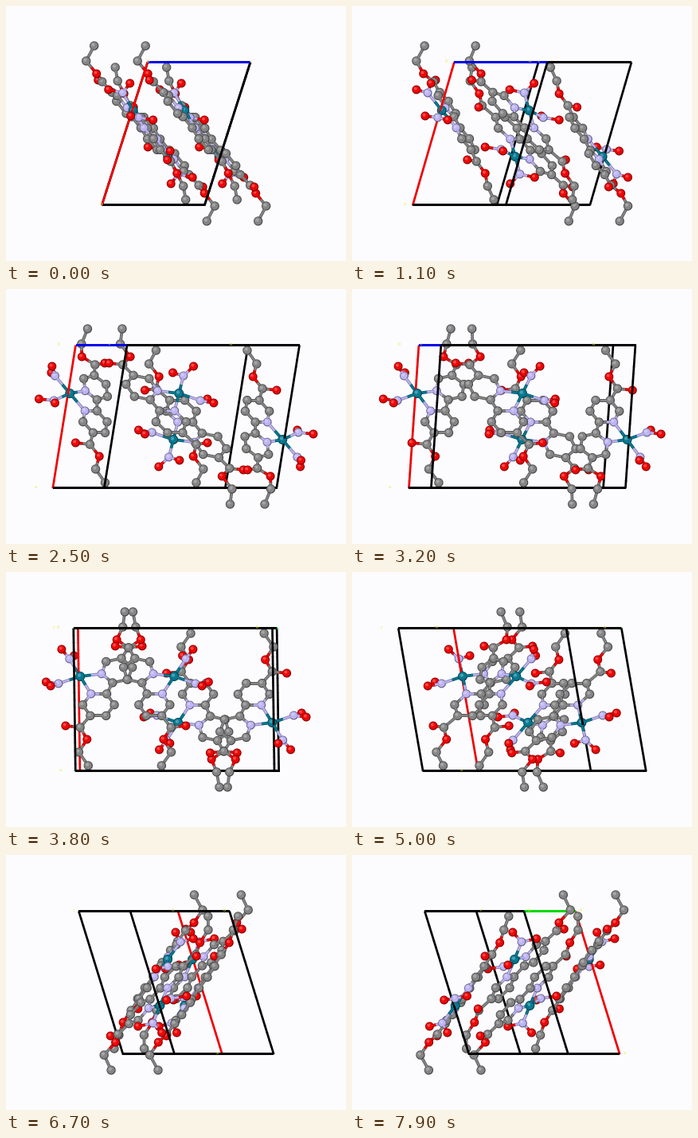
These frames come from a looping animation (427 px wide and 320 px high, 8000 ms). A matplotlib script:

```python
import numpy as np
import matplotlib.pyplot as plt
from matplotlib.animation import FuncAnimation
from matplotlib.collections import PolyCollection
from matplotlib.colors import to_rgb

W, H, FRAMES, STEP = 427, 320, 80, 2.5
CX, CY = 213.7, 160
A = np.array([-57.4, 179, 0])
B = np.array([0, 0, 250.0])
C = np.array([129, 0, 0])
ORIGIN = -(A + B + C) / 2

COLORS = {"C": "#858585", "O": "#f00505", "N": "#bdb4f4", "Pd": "#077a92"}
RADIUS = {"C": 5.7, "O": 5.5, "N": 5.5, "Pd": 6.0}


def ring(z, v, start, turn):
    """Hexagon in the tilted molecular plane."""
    t = np.radians(start + turn * np.arange(6))
    zs, ys = z + 19.7 * np.cos(t), (v + 19.7 * np.sin(t)) / 1.244
    xs = -54 + 0.74 * (ys + 29) - 0.194 * (zs + 123)
    return np.column_stack([xs, ys, zs])


PYRIDINE = ["N", "C", "C", "C", "C", "C"]
REST = [
    ("Pd", -54, -29, -123),
    # upper ester
    ("C", -93, -65, -64), ("O", -98, -67, -47), ("O", -100, -75, -79),
    ("C", -113, -91, -72), ("C", -103, -110, -69),
    # lower ester
    ("C", -7, 35, -121), ("O", -11, 33, -139.5), ("O", 1, 50, -112),
    ("C", 9, 66, -122), ("C", 12, 83, -110),
    # nitro groups
    ("N", -67, -51, -137), ("O", -58, -63, -146.5), ("O", -85, -55, -132),
    ("N", -47, -20, -150), ("O", -29, -17, -159), ("O", -57, -22, -166),
]
unit = np.vstack([ring(-77.4, -45.2, 165, -60), ring(-99, 8.3, 240, 60),
                  [r[1:] for r in REST]])
kinds = (PYRIDINE * 2 + [r[0] for r in REST]) * 4
bonds = [(i + k, (i + 1) % 6 + k) for k in (0, 6) for i in range(6)]
bonds += [(1, 7), (12, 0), (12, 6), (4, 13), (10, 18)]
for c in (13, 18):
    bonds += [(c, c + 1), (c, c + 2), (c + 2, c + 3), (c + 3, c + 4)]
for n in (23, 26):
    bonds += [(12, n), (n, n + 1), (n, n + 2)]

glide = unit * [1, 1, -1] + [64.5, 0, -125]
atoms = np.vstack([unit, glide, -glide, -unit])
n_unit = len(unit)


def shade(color, k):
    rgb = np.array(to_rgb(color))
    return tuple(rgb * k if k <= 1 else 1 - (1 - rgb) * (2 - k))


# straight pieces: start, end, [(width, colour), ...]
sticks = []
for m in range(4):
    for i, j in bonds:
        i, j = i + m * n_unit, j + m * n_unit
        p, q = atoms[i], atoms[j]
        mid, u = (p + q) / 2, (q - p) / np.linalg.norm(q - p)
        for k, s in ((i, p + 4.3 * u), (j, q - 4.3 * u)):
            col = COLORS[kinds[k]]
            sticks.append((s, mid, [(3.8, shade(col, 0.72)), (2.0, to_rgb(col))]))

PIECES = 20
for axis, o1, o2, col in ((A, B, C, "#f00000"), (B, A, C, "#00d800"), (C, A, B, "#0000e8")):
    for i in (0, 1):
        for j in (0, 1):
            start = ORIGIN + i * o1 + j * o2
            tint = to_rgb(col if i + j == 0 else "black")
            for k in range(PIECES):
                p = start + axis * k / PIECES
                q = start + axis * (k + 1.08) / PIECES
                sticks.append((p, q, [(2.7, tint)]))

starts = np.array([s[0] for s in sticks])
ends = np.array([s[1] for s in sticks])

turn = np.linspace(0, 2 * np.pi, 24, endpoint=False)
DISC = np.column_stack([np.cos(turn), np.sin(turn)])


def ball(kind):
    col, r = COLORS[kind], RADIUS[kind]
    return [(DISC * r, shade(col, 0.55)),
            (DISC * (r - 1) - 0.2, to_rgb(col)),
            (DISC * r * 0.36 - [1.2, 1.4], shade(col, 1.28))]


BALLS = {k: ball(k) for k in COLORS}


def project(pts, th):
    """Screen position and nearness after a turn about the vertical axis."""
    x, y, z = np.asarray(pts).T
    c, s = np.cos(th), np.sin(th)
    return np.column_stack([CX + x * c + z * s, CY + y]), x * s - z * c


def scene(th):
    items = []
    pos, near = project(atoms, th)
    for xy, d, kind in zip(pos, near, kinds):
        items.append((d, [(xy + shape, col) for shape, col in BALLS[kind]]))
    p, dp = project(starts, th)
    q, dq = project(ends, th)
    for a, b, d, (_, _, layers) in zip(p, q, (dp + dq) / 2, sticks):
        u = b - a
        length = np.hypot(*u)
        if length < 0.1:
            continue
        n = np.array([-u[1], u[0]]) / length / 2
        quads = [(np.array([a + n * w, b + n * w, b - n * w, a - n * w]), col)
                 for w, col in layers]
        items.append((d, quads))
    items.sort(key=lambda it: it[0])
    return [shape for _, shapes in items for shape in shapes]


# the small extra keeps rounding from losing a pixel column
fig = plt.figure(figsize=((W + 0.01) / 100, (H + 0.01) / 100), dpi=100, facecolor="#fcfcff")
ax = fig.add_axes([0, 0, 1, 1])
ax.set_xlim(0, W)
ax.set_ylim(H, 0)
ax.axis("off")
model = PolyCollection([], linewidths=0, edgecolors="none")
ax.add_collection(model, autolim=False)

label_pts = np.array([ORIGIN, ORIGIN + A, ORIGIN + B, ORIGIN + C]) + [0, -1.5, -25]
labels = [ax.text(0, 0, t, fontsize=3.6, color="#f2e640", ha="center", va="center")
          for t in "0abc"]


def draw(n):
    th = np.radians(STEP * max(n - 1, 0))
    shapes = scene(th)
    model.set_verts([s[0] for s in shapes])
    model.set_facecolor([s[1] for s in shapes])
    for text, xy in zip(labels, project(label_pts, th)[0]):
        text.set_position(xy)
    return [model, *labels]


anim = FuncAnimation(fig, draw, frames=FRAMES, interval=100, repeat=True, repeat_delay=0)
plt.show()
```
